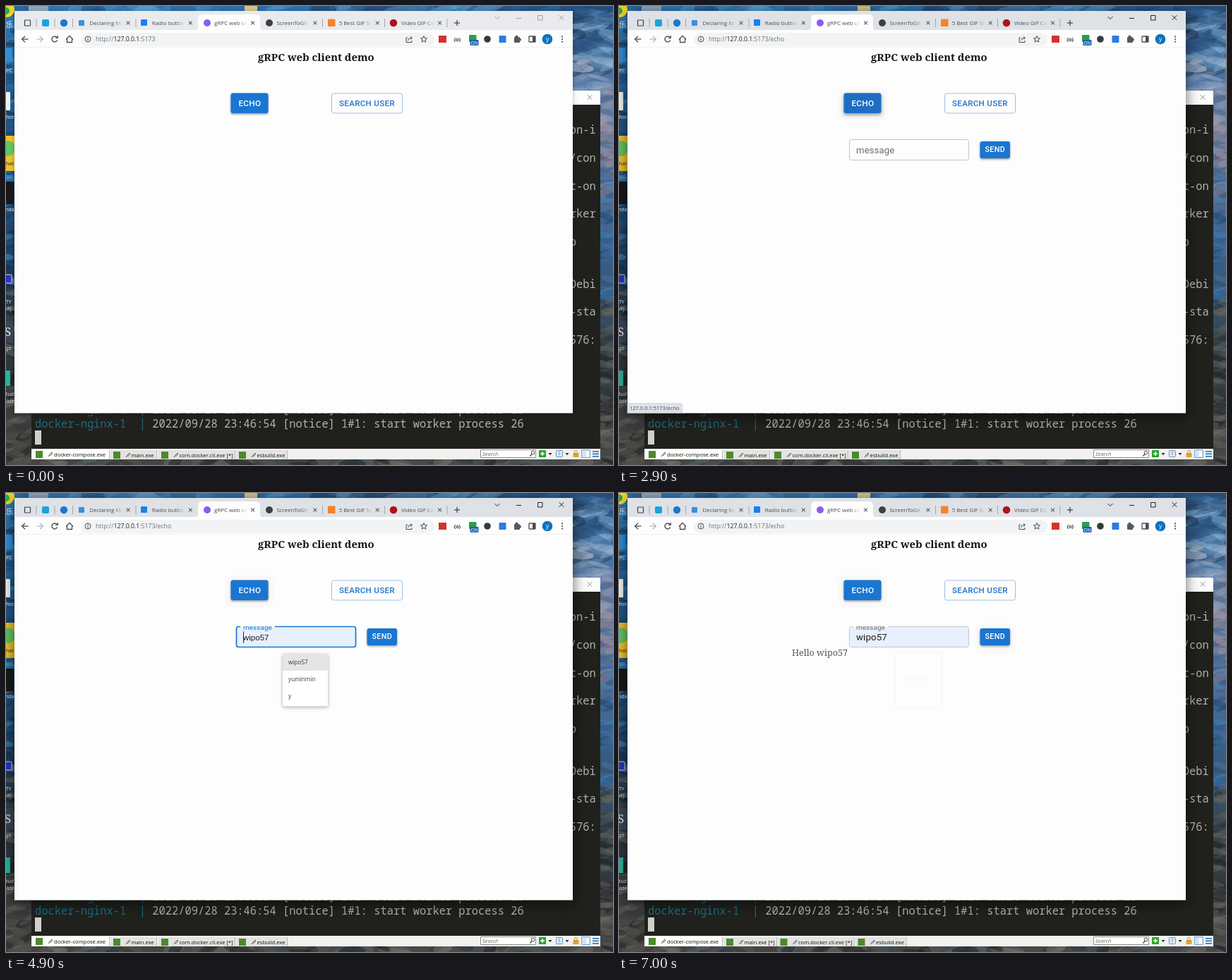
Write an HTML page with a canvas that moves like this. It is 860 by 651 pixels and loops after 8 s.

```html
<!DOCTYPE html>
<html lang="en">
<head>
<meta charset="utf-8">
<title>gRPC web client demo</title>
<style>
html, body { margin: 0; width: 100%; height: 100%; overflow: hidden; background: #20211c; }
canvas { display: block; width: 860px; height: 651px; }
</style>
</head>
<body>
<canvas id="stage" width="860" height="651"></canvas>
<script>
const W = 860, H = 651, LOOP = 8000;
const stage = document.getElementById('stage').getContext('2d');
let c = stage;

const UI = '"Open Sans", sans-serif';
const ROBOTO = 'Roboto, sans-serif';
const SERIF = '"Noto Serif", serif';
const MONO = '"Noto Sans Mono", monospace';
const PAGE = '#fdfdfd', BLUE = [25, 118, 210], NAVY = [21, 101, 192];
const USER = 'wipo57';

const clamp = v => Math.min(1, Math.max(0, v));
const ramp = (t, a, b) => clamp((t - a) / (b - a));
const ease = k => k * k * (3 - 2 * k);
const mix = (a, b, k) => `rgb(${a.map((v, i) => Math.round(v + (b[i] - v) * k))})`;

function rect(x, y, w, h, color) {
  c.fillStyle = color;
  c.fillRect(x, y, w, h);
}
function box(x, y, w, h, r, fill, stroke, lw = 1) {
  c.beginPath();
  c.roundRect(x, y, w, h, r);
  if (fill) { c.fillStyle = fill; c.fill(); }
  if (stroke) { c.strokeStyle = stroke; c.lineWidth = lw; c.stroke(); }
}
function disc(x, y, r, fill, stroke, lw = 1) {
  c.beginPath();
  c.arc(x, y, r, 0, 7);
  if (fill) { c.fillStyle = fill; c.fill(); }
  if (stroke) { c.strokeStyle = stroke; c.lineWidth = lw; c.stroke(); }
}
function line(pts, color, lw = 1) {
  c.beginPath();
  for (let i = 0; i < pts.length; i += 2) c.lineTo(pts[i], pts[i + 1]);
  c.strokeStyle = color;
  c.lineWidth = lw;
  c.stroke();
}
function cross(x, y, r, color, lw = 1) {
  line([x - r, y - r, x + r, y + r], color, lw);
  line([x + r, y - r, x - r, y + r], color, lw);
}
function text(s, x, y, font, color, spacing = 0) {
  c.font = font;
  c.letterSpacing = spacing + 'px';
  c.fillStyle = color;
  c.fillText(s, x, y);
}
function shaded(blur, dy, alpha, draw) {
  c.save();
  c.shadowColor = `rgba(0,0,0,${alpha})`;
  c.shadowBlur = blur;
  c.shadowOffsetY = dy;
  draw();
  c.restore();
}
function fade(alpha, draw) {
  if (alpha <= 0) return;
  c.save();
  c.globalAlpha = alpha;
  draw();
  c.restore();
}
function vertical(x, y, w, h, colors) {
  const g = c.createLinearGradient(0, y, 0, y + h);
  colors.forEach((col, i) => g.addColorStop(i / (colors.length - 1), col));
  rect(x, y, w, h, g);
}

// Desktop: soft sky, sea and rocks, with seeded streaks
function paintDesktop() {
  let seed = 7;
  const rnd = () => (seed = seed * 16807 % 2147483647) / 2147483647;
  const streaks = (n, x, y, w, h, colors, size) => {
    c.save();
    c.beginPath();
    c.rect(x, y, w, h);
    c.clip();
    for (let i = 0; i < n; i++) {
      c.globalAlpha = 0.15 + rnd() * 0.4;
      c.fillStyle = colors[Math.floor(rnd() * colors.length)];
      c.beginPath();
      c.ellipse(x + rnd() * w, y + rnd() * h, size * (1 + rnd() * 2), size * (0.3 + rnd() * 0.5), rnd() - 0.6, 0, 7);
      c.fill();
    }
    c.restore();
  };
  vertical(0, 0, 430, H, ['#2d78b4', '#2a6ba2', '#1f527f', '#1f4a70', '#203f5b', '#22323f', '#393c3c', '#45443f']);
  vertical(430, 0, 430, H, ['#2a4f7b', '#3d6a9a', '#7590b2', '#62708f', '#3d6592', '#355573', '#35434b', '#34383a', '#4a4b48']);
  streaks(60, 803, 0, 57, 100, ['#1b3353', '#5e9bd0', '#284b74', '#86b4da'], 11);
  streaks(24, 803, 70, 57, 55, ['#b3bfd2', '#8a9bb8', '#5c7fa9'], 9);
  streaks(40, 842, 120, 18, 150, ['#4c5674', '#8d8ba6', '#b39da5', '#33639a'], 9);
  streaks(40, 842, 230, 18, 190, ['#1d4774', '#4a81b3', '#28598a'], 7);
  streaks(70, 842, 410, 18, 241, ['#17191b', '#5d6669', '#2a333a', '#6c685e'], 7);
  streaks(80, 0, 0, 12, 400, ['#17395b', '#4794c9', '#225c8f', '#122f4b'], 6);
  streaks(80, 0, 380, 36, 271, ['#16191b', '#5c5b55', '#2b3236', '#777166'], 7);
  streaks(60, 36, 643, 806, 8, ['#1b1f21', '#65706f', '#3f5057', '#80796b'], 9);
  streaks(50, 0, 0, W, 7, ['#1d4c7c', '#5aa3d4', '#2a6aa4'], 12);

  rect(32, 0, 28, 7, '#8ea9bd');
  rect(338, 0, 18, 7, '#d8c68a');
  disc(1, 5, 11, '#f2d426');
  disc(0, 7, 5, '#2fa84f');
  box(-6, 59, 15, 20, 1, '#2f8fd8');
  box(-6, 122, 12, 26, 1, '#f2f2f2');
  rect(0, 184, 12, 50, '#f0c22c');
  disc(2, 202, 11, '#63c564');
  rect(0, 249, 11, 32, '#17181a');
  box(-8, 381, 16, 12, 1, '#2734c8', '#d8d8d8');
  rect(0, 446, 11, 32, '#3a4654');
  rect(0, 517, 6, 22, '#27b59b');
  text('S', -2, 468, '17px ' + SERIF, '#f0f0f0');
  [['乐', 0, 30], ['PC', 0, 94], ['hot', 0, 160], ['nda', -1, 291], ['TY', 0, 422],
   ['bit)', -3, 432], ['ipt-', -1, 488], ['tud', 0, 553], ['side', -2, 563]]
    .forEach(([s, x, y]) => text(s, x, y, (s === '乐' ? '10px "Noto Sans CJK SC", ' : '7px ') + (s === '乐' ? 'sans-serif' : UI), '#fff'));
  text('hat', 0, 226, '7px ' + UI, '#222');
}

function tabBar(t) {
  rect(36, 628, 806, 15, '#f1f1f1');
  rect(36, 628, 806, 1, '#fafafa');
  const busy = t >= 6600, dx = busy ? 8.5 : 0;
  const tabs = [
    [40, 'docker-compose.exe', 108], [150, busy ? 'main.exe [*]' : 'main.exe', busy ? 75 : 65],
    [218 + dx, 'com.docker.cli.exe [*]', 108], [328 + dx, 'esbuild.exe', 72]
  ];
  tabs.forEach(([x, s, w], i) => {
    const dy = i ? 1 : 0;
    rect(x - 2, 629 + dy, w, 14 - dy, i ? '#e3e3e3' : '#fdfdfd');
    line([x + w - 1.5, 630, x + w - 1.5, 643], '#b9b9b9');
    rect(x + 2, 631 + dy, 10, 10, '#4d8a2c');
    // rocket-like pointer mark
    line([x + 20, 639 + dy, x + 22, 636 + dy, x + 25, 633 + dy, x + 25.5, 635 + dy, x + 22, 638 + dy], '#555');
    text(s, x + 28 - (i ? 0.5 : 0), 639 + dy, '7.6px ' + UI, '#111');
  });
  box(672.5, 629.5, 78, 11, 0, '#fff', '#8c8c8c');
  text('Search', 675, 638, 'italic 7.5px ' + UI, '#666');
  disc(746.5, 633.5, 2.3, null, '#444');
  line([745, 635.5, 742.5, 638.5], '#444', 1.3);
  box(755, 630, 10, 10, 1, '#28a428');
  rect(759.3, 632, 1.6, 6, '#fff');
  rect(757, 634.2, 6, 1.6, '#fff');
  for (const x of [771, 795]) {
    c.beginPath();
    c.moveTo(x - 2.5, 634);
    c.lineTo(x + 2.5, 634);
    c.lineTo(x, 637);
    c.fillStyle = '#222';
    c.fill();
  }
  box(779.5, 630.5, 9, 9, 1, '#dce9f6', '#6d93bd');
  line([784, 632, 784, 637], '#6d93bd');
  rect(803.5, 634, 8, 6, '#dfa432');
  box(805.5, 630.5, 4, 5, 2, null, '#b98a32');
  box(815.5, 629.5, 12, 11, 0, '#cfe4f7', '#7aa7d2');
  rect(822, 631, 4, 8, '#fff');
  for (let i = 0; i < 3; i++) rect(831, 631 + i * 3.5, 9, 1.6, '#2378bd');
}

function terminal(t) {
  rect(36, 140, 806, 489, '#20211c');
  rect(36, 120, 806, 20, '#fdfdfd');
  cross(827, 129.5, 3.3, '#8f8f8f');
  const font = '15.4px ' + MONO, grey = '#b3b4ad', step = 9.24;
  const row = n => 598 - 19.84 * n;
  const log = (n, pid) => {
    text('docker-nginx-1', 41, row(n), font, '#1d6b84');
    text('|', 41 + step * 16, row(n), font, '#1d6b84');
    text('2022/09/28 23:46:54 [notice] 1#1: start worker process ' + pid, 41 + step * 18, row(n), font, grey);
  };
  log(1, 25);
  log(0, 26);
  [[21, 'on-i'], [19, '/con'], [17, 't-on'], [15, 'rker'], [13, 'p'], [10, 'Debi'], [8, '-sta'], [6, '576:']]
    .forEach(([n, s]) => text(s, 41 + step * 82, row(n), font, grey));
  rect(41, 602, 9, 20, '#d0d0cb');
  tabBar(t);
}

function tabStrip(active) {
  const dim = '#5a5e63';
  rect(12, 7, 791, 28, active ? '#dee1e6' : '#e8eaee');
  c.beginPath();
  c.moveTo(266, 35);
  c.quadraticCurveTo(272, 35, 272, 29);
  c.lineTo(272, 18);
  c.quadraticCurveTo(272, 12, 278, 12);
  c.lineTo(354, 12);
  c.quadraticCurveTo(360, 12, 360, 18);
  c.lineTo(360, 29);
  c.quadraticCurveTo(360, 35, 366, 35);
  c.fillStyle = PAGE;
  c.fill();

  box(26.5, 20, 8, 8, 0.5, null, '#3c4043', 1.2);
  box(51, 19, 10, 10, 2, '#1ba3dc');
  disc(82, 24, 5.2, '#1b78cc');
  [43, 69, 94.5, 184, 448.5, 536.5, 625].forEach(x => line([x, 18, x, 30], '#a3a7ad'));
  box(103, 20, 8, 8, 1, '#3d8fd9');
  box(191, 19, 9, 9, 1, '#1681f2');
  disc(285, 24, 5, '#8a5cf0');
  disc(373, 24, 5, '#3c4043');
  box(456, 18.5, 10.5, 10.5, 1, '#f5822b');
  disc(549, 24, 5.3, '#ad1218');
  ['Declaring Mod', 'Radio button ', 'gRPC web clie', 'ScreenToGif -', '5 Best GIF Sof', 'Video GIF Cap'].forEach((s, i) => {
    const x = 118.5 + i * 88.3;
    const g = c.createLinearGradient(x + 34, 0, x + 47, 0);
    g.addColorStop(0, 'rgba(70,74,79,1)');
    g.addColorStop(1, 'rgba(70,74,79,0)');
    text(s, x, 27, '7.9px ' + UI, g);
    cross(x + 54.5, 24, 2.4, dim, 1.1);
  });
  line([635, 24, 643, 24], '#45494d', 1.3);
  line([639, 20, 639, 28], '#45494d', 1.3);

  const cap = active ? '#202124' : '#9b9fa5';
  line([692.5, 15, 696, 18.5, 699.5, 15], cap);
  line([723, 17.5, 730, 17.5], cap);
  box(753.5, 13.5, 6.5, 6.5, 0, null, cap);
  cross(787, 16.5, 3.3, cap);
}

function toolbar(echo) {
  const ink = '#4a4d51';
  rect(12, 34, 791, 25, PAGE);
  rect(12, 58.5, 791, 1, '#e3e5e8');
  for (const [x, d, col] of [[27, -1, ink], [48, 1, '#b4b7ba']]) {
    line([x - 4.5, 47, x + 4.5, 47], col, 1.3);
    line([x, 42.7, x + 4.3 * d, 47, x, 51.3], col, 1.3);
  }
  c.beginPath();
  c.arc(69, 47, 4, 0.4, 5.6);
  c.strokeStyle = ink;
  c.lineWidth = 1.4;
  c.stroke();
  line([70, 45.4, 73.2, 45.4, 73.2, 42], ink, 1.4);
  line([85, 47.5, 90, 42.5, 95, 47.5], ink, 1.3);
  line([86.5, 46.5, 86.5, 51.5, 93.5, 51.5, 93.5, 46.5], ink, 1.3);

  box(106, 38, 501, 19, 9.5, '#f1f3f4');
  disc(116, 47, 4, null, ink);
  rect(115.5, 46.3, 1.1, 3, ink);
  rect(115.5, 44.5, 1.1, 1.1, ink);
  const font = '8.7px ' + UI;
  let x = 127;
  for (const [s, col] of [['http://', '#73777c'], ['127.0.0.1', '#202124'], [':5173' + (echo ? '/echo' : ''), '#6a6e73']]) {
    text(s, x, 50.2, font, col);
    x += c.measureText(s).width;
  }
  line([569, 45, 567, 45, 567, 51.5, 575, 51.5, 575, 49], ink);
  line([569.5, 49, 571, 46, 575, 45.3], ink);
  line([573, 43, 575.5, 45.3, 573, 47.6], ink);
  c.beginPath();
  for (let i = 0; i < 10; i++) {
    const a = i * Math.PI / 5 - Math.PI / 2, r = i % 2 ? 2.1 : 4.8;
    c.lineTo(592 + r * Math.cos(a), 47.3 + r * Math.sin(a));
  }
  c.closePath();
  c.strokeStyle = ink;
  c.lineWidth = 1;
  c.stroke();

  box(613, 42, 11, 10, 0, '#d2342c');
  text('{o}', 634.5, 49.6, 'bold 7px ' + UI, '#333');
  box(656, 41, 10.5, 10, 1, '#2a9c53');
  box(657.5, 48, 12, 8, 1, '#1d62ab');
  text('ON', 658.5, 54.6, '6.5px ' + UI, '#fff');
  disc(682, 47, 4.8, '#353a3d');
  box(698.5, 42, 10, 10, 1, '#2a7de1');
  box(720, 44, 8, 8, 1, '#55595e');
  disc(723.5, 43.5, 2, '#55595e');
  disc(728, 47.8, 2, '#55595e');
  box(741, 43, 9, 8, 0.5, null, ink, 1.3);
  rect(746, 43, 4, 8, ink);
  disc(767, 47, 7.3, '#0f72bd');
  text('y', 765, 49.8, '8.5px ' + UI, '#fff');
  [43.4, 47, 50.6].forEach(y => disc(788, y, 1.05, ink));
}

function button(x, y, w, h, label, font, lx, ly, hover, ripple) {
  shaded(3 + hover * 3, 1.6 + hover * 0.8, 0.42, () => box(x, y, w, h, 3, mix(BLUE, NAVY, hover)));
  if (ripple > 0 && ripple < 1) {
    c.save();
    c.beginPath();
    c.roundRect(x, y, w, h, 3);
    c.clip();
    disc(x + w / 2, y + h / 2, w * 0.7 * Math.min(1, 0.2 + ripple * 1.4), `rgba(255,255,255,${0.27 * (1 - ripple)})`);
    c.restore();
  }
  text(label, lx, ly, font, '#fff', 0.3);
}

function halo(x, y, w, h, k) {
  fade(k, () => {
    box(x, y, w, h, 13, '#fbfbfb');
    box(x + 3, y + 3, w - 6, h - 6, 10, '#f9f9f9');
  });
}

function field(t) {
  const focus = t >= 3900 && t < 6000;
  const hover = t >= 3500 && t < 3900;
  const up = ease(ramp(t, 3800, 4100));
  const filled = t >= 4900;
  const edge = focus ? '#1976d2' : hover ? '#303030' : '#c3c4c8';
  box(326.5, 189.5, 169, 29, 3, filled ? '#e8f0fe' : null, edge, focus ? 1.7 : 1);
  if (up > 0) {
    const half = 24.5 * up;
    rect(356.5 - half, 188, half * 2, 2.6, PAGE);
    if (filled) rect(356.5 - half, 190, half * 2, 1.5, '#e8f0fe');
  }
  text('message', 336, 209 - 15 * up, (13.2 - 3.3 * up) + 'px ' + ROBOTO, focus ? '#1976d2' : '#6b6b6b', 0.1);

  const chosen = t >= 5300;
  if (chosen) text(USER, 336, 209, '13.3px ' + ROBOTO, '#1d1d1d', 0.1);
  else if (filled) text(USER, 336, 209, '11.5px "Liberation Sans", sans-serif', '#1d1d1d');

  const blink = (t >= 4000 && t < 4400) || (t >= 4900 && t < 5800);
  if (blink) rect(chosen ? 379.5 : 336, 196.5, 1, 16.5, '#222');
}

function suggestions(t) {
  const shown = ramp(t, 3800, 4100) * (1 - ramp(t, 5200, 5400));
  if (t >= 5400) {
    box(391, 226, 66, 79, 4, null, '#f8f8f8', 2.5);
    line([401, 265, 437, 265], '#f9f9f9', 3);
    line([404, 226, 408, 223.5, 412, 226], '#f9f9f9', 1.5);
  }
  fade(shown, () => {
    line([400, 228, 405, 223.5, 410, 228], '#eeeeee');
    shaded(5, 1.5, 0.32, () => box(392, 228, 64, 74.5, 2, '#fff'));
    if (t >= 4900) rect(392, 228, 64, 24, '#e5e5e5');
    [USER, 'yuminmin', 'y'].forEach((s, i) => text(s, 400, 243.4 + i * 24, '8.2px ' + UI, '#3a3a3a'));
  });
}

function page(t) {
  rect(12, 59, 791, 518, PAGE);
  text('gRPC web client demo', 357, 78, 'bold 14.8px ' + SERIF, '#151515');

  halo(309, 115, 72, 49, ramp(t, 2400, 2800));
  const hover = (t >= 2000 ? 0.65 + 0.25 * ramp(t, 2300, 2600) : 0) * (1 - ramp(t, 3300, 3700));
  button(318.5, 123.5, 53, 28.5, 'ECHO', '500 11.8px ' + ROBOTO, 329.4, 141.7, hover, ramp(t, 2300, 3000));
  box(461.5, 124, 100, 28, 3, null, '#9dbfe4');
  text('SEARCH USER', 472, 141.6, '500 11.6px ' + ROBOTO, '#2272c8', 0.3);

  if (t >= 2600) {
    halo(503, 184, 60, 43, ramp(t, 5900, 6400));
    field(t);
    suggestions(t);
    const on = (t >= 5600 ? 0.85 : 0) * (1 - 0.6 * ramp(t, 6500, 6600)) * (t >= 7000 ? 0 : 1);
    button(511.5, 192, 42.5, 24, 'SEND', '500 10.8px ' + ROBOTO, 518.5, 207.3, on, ramp(t, 5900, 6500));
  }
  if (t >= 6300) text('Hello ' + USER, 245, 231, '12.6px ' + SERIF, '#5a5a5a');

  fade(ramp(t, 2400, 2700) * (1 - ramp(t, 3300, 3700)), () => {
    box(12, 563.5, 77.5, 13.5, [0, 3, 0, 0], '#dee1e6', '#cfd2d7', 0.7);
    text('127.0.0.1:5173/echo', 15, 573.4, '7.5px ' + UI, '#4a4e53');
  });
}

const desktop = document.createElement('canvas');
desktop.width = W;
desktop.height = H;
c = desktop.getContext('2d');
paintDesktop();
c = stage;

function draw(t) {
  const active = t >= 2400;
  c.drawImage(desktop, 0, 0);
  terminal(t);
  shaded(active ? 18 : 6, active ? 4 : 1, active ? 0.6 : 0.3, () => rect(12, 7, 791, 570.5, PAGE));
  tabStrip(active);
  toolbar(t >= 2600);
  page(t);
}

const start = performance.now();
function tick() {
  const t = (performance.now() - start) % LOOP;
  draw(Math.floor(t / 100) * 100);
  requestAnimationFrame(tick);
}
tick();
</script>
</body>
</html>
```
